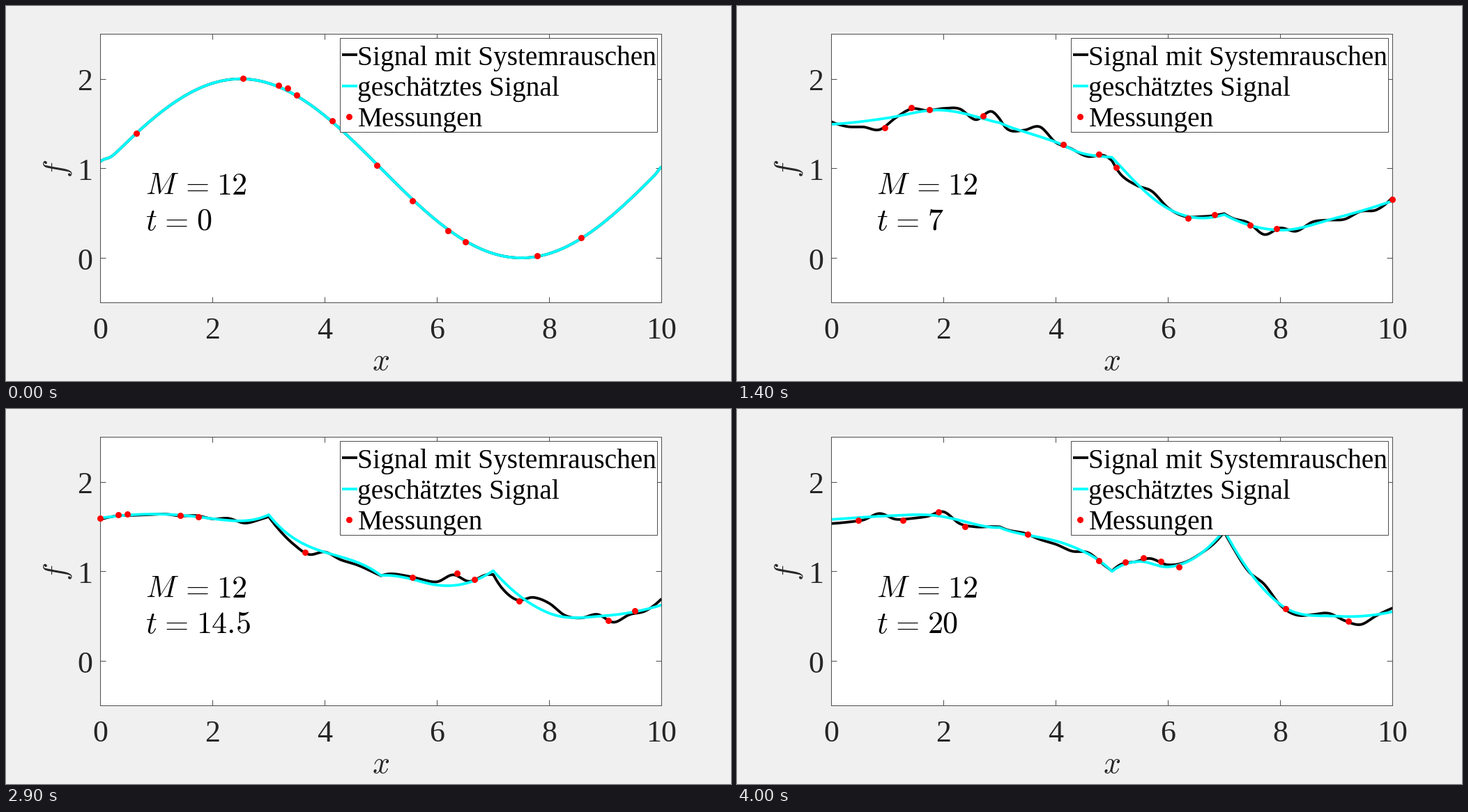
A matplotlib script for the animation above (4100 ms loop, 1040 by 539 pixels).

```python
import numpy as np
import matplotlib.pyplot as plt
from matplotlib.animation import FuncAnimation
from matplotlib.patches import Rectangle

W, H, DPI = 1040, 539, 100
PX = 72 / DPI
FRAMES, INTERVAL = 41, 100
INK, EDGE = "#262626", "#4d4d4d"
X = np.linspace(0, 10, 801)
SENSORS = np.linspace(0, 10, 64)
M = 12

plt.rcParams.update({"mathtext.fontset": "cm", "font.family": "Liberation Serif"})


# ---------- model ----------
def smooth(x, xs, ys):
    """Cubic curve through the points (xs, ys)."""
    slopes = np.gradient(ys, xs, edge_order=2)
    k = np.clip(np.searchsorted(xs, x, side="right") - 1, 0, len(xs) - 2)
    h = xs[k + 1] - xs[k]
    u = (x - xs[k]) / h
    v = 1 - u
    return (ys[k] * (1 + 2 * u) * v**2 + ys[k + 1] * (1 + 2 * v) * u**2
            + h * u * v * (slopes[k] * v - slopes[k + 1] * u))


KNOTS = np.array([0, 1, 2, 3, 4, 4.5, 5, 5.5, 6, 7, 8, 9, 10])


def kinked(ys):
    """Smooth curve through the knots with corners at x = 3, 5 and 7."""
    out = np.empty_like(X)
    for lo, hi in ((0, 3), (3, 5), (5, 7), (7, 10)):
        part = (KNOTS >= lo) & (KNOTS <= hi)
        here = (X >= lo) & (X <= hi)
        out[here] = smooth(X[here], KNOTS[part], ys[part])
    return out


def sources(x, t):
    """Damped waves spreading from two oscillating sources."""
    total = 0
    for centre, amp in ((3, -0.22), (5, 0.22)):
        d = np.abs(x - centre) / 0.7
        total = total + amp * np.exp(-d) * np.cos(t - d)
    return total


# Key heights of the estimate, in hundredths, by time
KEYS = {
    2.5: [136, 155, 190, 200, 150, 110, 47, 50, 41, 23, 10, 49, 79],
    5: [147, 151, 177, 176, 140, 108, 106, 58, 39, 31, 24, 47, 73],
    9.5: [151, 161, 167, 173, 116, 91, 67, 66, 58, 72, 41, 42, 52],
    12.5: [153, 159, 166, 134, 118, 111, 115, 91, 73, 92, 53, 54, 71],
    16: [164, 169, 164, 175, 124, 107, 91, 82, 83, 106, 54, 48, 56],
    20: [158, 162, 161, 149, 134, 122, 100, 111, 105, 146, 63, 50, 55],
}
TIMES = [0, *KEYS]
start = (1 + np.sin(np.pi * X / 5) + 0.075 * np.exp(-(X / 0.14) ** 2)
         + 0.02 * np.exp(-((X - 10) / 0.08) ** 2))
DRIFT = [start - sources(X, 0)]
DRIFT += [kinked(np.array(ys) / 100 - sources(KNOTS, t)) for t, ys in KEYS.items()]


def simulate(i):
    """Time, noisy signal, estimate and measurements of step i."""
    t = i / 2
    j = min(np.searchsorted(TIMES, t, side="right") - 1, len(TIMES) - 2)
    s = (t - TIMES[j]) / (TIMES[j + 1] - TIMES[j])
    estimate = (1 - s) * DRIFT[j] + s * DRIFT[j + 1] + sources(X, t)

    rng = np.random.default_rng(i)
    ripple = smooth(X, np.linspace(0, 10, 36), rng.normal(0, 0.04, 36))
    signal = estimate + min(t, 1) * ripple
    sx = rng.choice(SENSORS, M, replace=False)
    sy = np.interp(sx, X, signal) + rng.normal(0, 0.015, M)
    return t, signal, estimate, sx, sy


# ---------- stage ----------
fig = plt.figure(figsize=(W / DPI, H / DPI), dpi=DPI, facecolor="#f0f0f0")
ax = fig.add_axes([135.4 / W, 1 - 426.4 / H, 805 / W, 386 / H])
ax.set(xlim=(0, 10), ylim=(-0.5, 2.5), xticks=range(0, 11, 2), yticks=range(3))
ax.tick_params(direction="in", top=True, right=True, length=8 * PX, width=PX,
               color=EDGE, labelbottom=False, labelleft=False)
for spine in ax.spines.values():
    spine.set(color=EDGE, linewidth=PX)

stage = fig.add_axes([0, 0, 1, 1])
stage.set(xlim=(0, W), ylim=(H, 0))
stage.axis("off")


def label(x, y, text, size=44, color="black", ha="left", va="baseline", **kw):
    return stage.text(x, y, text, fontsize=size * PX, color=color, ha=ha, va=va, **kw)


for v in range(0, 11, 2):
    label(135 + 80.5 * v, 478, str(v), color=INK, ha="center")
for v in range(3):
    label(124.5, 379 - 129 * v, str(v), color=INK, ha="right")
label(538, 523.5, "$x$", color=INK, ha="center")
label(74.5, 234, "$f$", color=INK, ha="center", va="center", rotation=90)

label(200, 271, "$M$")
label(271, 271, "$=$", ha="center")
label(302.5, 271, f"${M}$")
label(199.5, 322, "$t$")
label(241, 322, "$=$", ha="center")
clock = label(273, 322, "")

LINE = dict(linewidth=3.8 * PX, solid_capstyle="butt", solid_joinstyle="round")
DOT = dict(marker="o", linestyle="", color="red", markersize=9 * PX, markeredgewidth=0)

stage.add_patch(Rectangle((478.9, 45.9), 455, 135, facecolor="white",
                          edgecolor=EDGE, linewidth=PX))
stage.plot([481.5, 503.5], [70, 70], color="black", **LINE)
stage.plot([481.5, 503.5], [114.5, 114.5], color="cyan", **LINE)
stage.plot([491.5], [159], **DOT)
for row, name in enumerate(("Signal mit Systemrauschen", "geschätztes Signal", "Messungen")):
    label(504.5, 84.5 + 44.3 * row, name, size=39.4)

signal_line, = ax.plot([], [], color="black", **LINE)
estimate_line, = ax.plot([], [], color="cyan", **LINE)
dots, = ax.plot([], [], clip_on=False, zorder=5, **DOT)


def update(i):
    t, signal, estimate, sx, sy = simulate(i)
    signal_line.set_data(X, signal)
    estimate_line.set_data(X, estimate)
    dots.set_data(sx, sy)
    clock.set_text(f"${t:g}$")
    return signal_line, estimate_line, dots, clock


anim = FuncAnimation(fig, update, frames=FRAMES, interval=INTERVAL,
                     repeat=True, repeat_delay=0)
plt.show()
```
